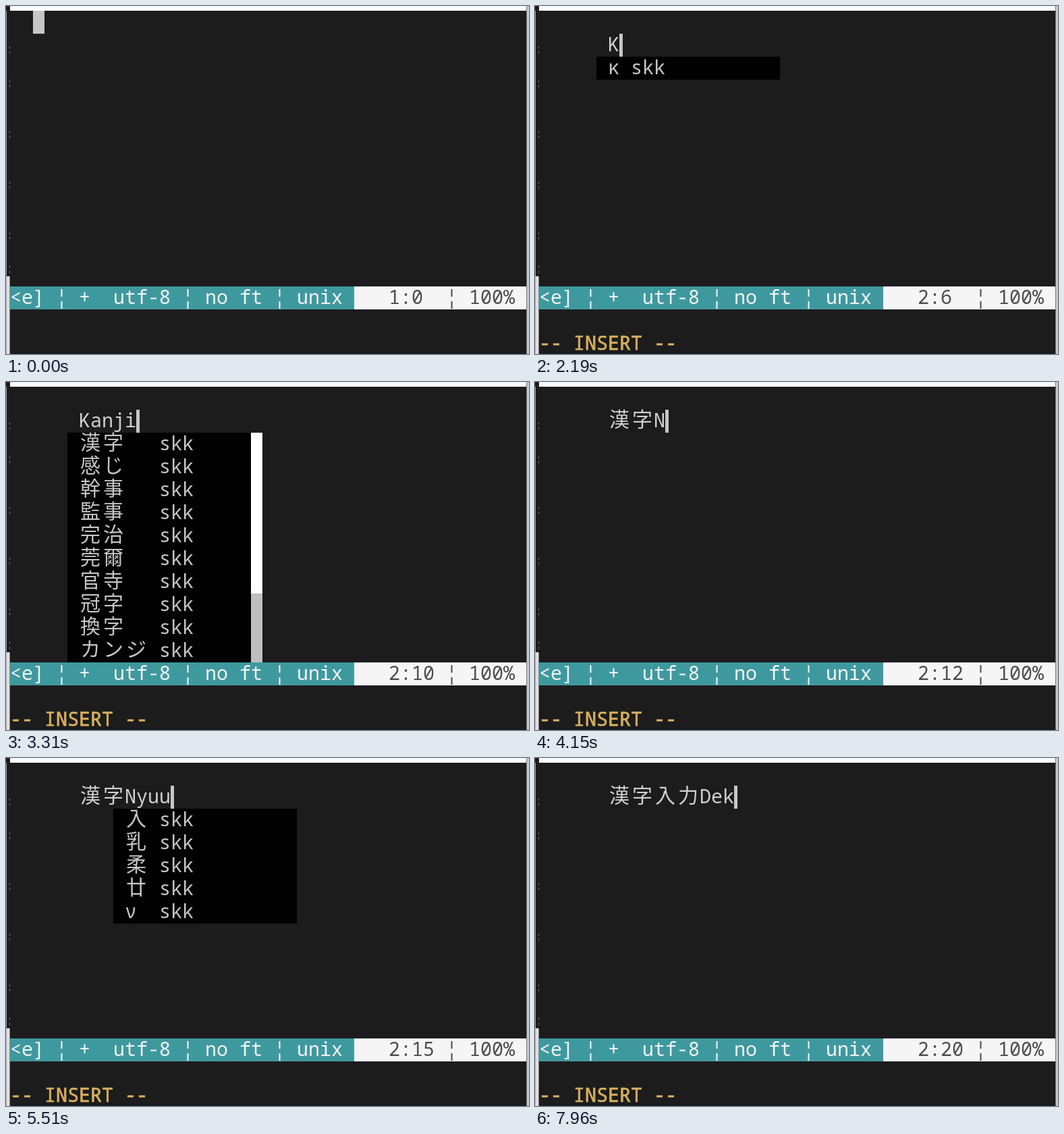
Recreate the animation shown at these times as an HTML page. Size 775 by 515 pixels, loop 8000 ms.

```html
<!DOCTYPE html>
<html lang="ja">
<head>
<meta charset="utf-8">
<title>Terminal input</title>
<style>
html, body { margin: 0; width: 100%; height: 100%; overflow: hidden; background: #1c1c1c; }
svg { display: block; position: absolute; left: 0; top: 0; }
text {
  font: 28.333px "Noto Sans Mono", "DejaVu Sans Mono", monospace;
  font-variant-ligatures: none;
  white-space: pre;
}
.wide { font: 30px "Noto Sans CJK JP", "Noto Sans CJK", sans-serif; text-anchor: middle; }
.mode { stroke: #d7af5f; stroke-width: .7px; }
</style>
</head>
<body>
<svg width="775" height="515" viewBox="0 0 775 515">
  <g id="back"></g>
  <g id="live"></g>
</svg>
<script>
const LOOP = 8000, CELL = 17, ROW = 34, LEFT = 6, TOP = 7;
const FG = '#d0d0d0', CURSOR = '#c6c6c6';
const TEXT_COL = 6;
const KANJI = ['漢字', '感じ', '幹事', '監事', '完治', '莞爾', '官寺', '冠字', '換字', 'カンジ'];
const NYUU = ['入', '乳', '柔', '廿', 'ν'];

// Each step lists only what differs from the resting state.
const steps = [
  [0, { block: true, pos: '1:0' }],
  [250, { hide: true, pos: '1:0' }],
  [400, { block: true, pos: '1:0' }],
  [800, { line: 0, col: 2, pos: '1:1', insert: true }],
  [950, { col: 2, pos: '2:1' }],
  [1230, {}],
  [1910, { text: 'K' }],
  [2190, { text: 'K', menu: ['κ'] }],
  [2330, { text: 'Ka' }],
  [2610, { text: 'Kan' }],
  [2880, { text: 'Kanji' }],
  [3310, { text: 'Kanji', menu: KANJI, bar: true }],
  [3600, { text: '漢字', menu: KANJI, bar: true, picked: true, pos: '2:10' }],
  [3730, { text: '漢字', menu: KANJI, bar: true, picked: true }],
  [4150, { text: '漢字N' }],
  [4440, { text: '漢字N', menu: ['ν'], from: 4 }],
  [4720, { text: '漢字Ny' }],
  [4970, { text: '漢字Nyu' }],
  [5220, { text: '漢字Nyuu' }],
  [5510, { text: '漢字Nyuu', menu: NYUU, from: 4 }],
  [5760, { text: '漢字Nyuur' }],
  [5910, { text: '漢字Nyuury' }],
  [6060, { text: '漢字Nyuuryo' }],
  [6210, { text: '漢字Nyuuryok' }],
  [6360, { text: '漢字Nyuuryoku' }],
  [6610, { text: '漢字Nyuuryoku', menu: ['入力'], from: 4 }],
  [7040, { text: '漢字入力', menu: ['入力'], from: 4, picked: true, pos: '2:20' }],
  [7170, { text: '漢字入力', menu: ['入力'], from: 4, picked: true }],
  [7570, { text: '漢字入力D' }],
  [7840, { text: '漢字入力De' }],
  [7960, { text: '漢字入力Dek' }]
];

const px = col => LEFT + col * CELL;
const py = row => TOP + row * ROW;
const isWide = ch => ch.codePointAt(0) > 0x2e80;
const cells = s => [...s].reduce((n, ch) => n + (isWide(ch) ? 2 : 1), 0);
const bytes = s => new TextEncoder().encode(s).length;
const rect = (x, y, w, h, fill) =>
  `<rect x="${x}" y="${y}" width="${w}" height="${h}" fill="${fill}"/>`;
const escape = s => s.replace(/&/g, '&amp;').replace(/</g, '&lt;');

function write(s, col, row, fill, cls = '') {
  const y = py(row) + 26;
  let out = '';
  for (const run of s.match(/[\u2e80-\uffff]|[^\u2e80-\uffff]+/g) || []) {
    const wide = isWide(run);
    out += `<text xml:space="preserve" class="${wide ? 'wide' : cls}" fill="${fill}" ` +
      `x="${px(col) + (wide ? CELL : 0)}" y="${wide ? y - 1 : y}">${escape(run)}</text>`;
    col += cells(run);
  }
  return out;
}

function drawMenu({ menu, from = 0, picked, bar }) {
  const col = TEXT_COL + from - 1;
  const widest = Math.max(...menu.map(cells));
  let out = rect(px(col), py(2), 16 * CELL, menu.length * ROW, '#000');
  menu.forEach((word, i) => {
    const on = picked && i === 0;
    const ink = on ? '#000' : CURSOR;
    if (on) out += rect(px(col), py(2), 16 * CELL, ROW, CURSOR);
    out += write(word, col + 1, i + 2, ink);
    out += write('skk', col + 2 + widest, i + 2, ink);
  });
  if (bar) {
    out += rect(px(col + 16), py(2), CELL, menu.length * ROW, '#bebebe');
    out += rect(px(col + 16), py(2), CELL, 7 * ROW, '#fff');
  }
  return out;
}

function drawStep(s) {
  const text = s.text || '';
  const idle = s.block || s.hide;
  const line = s.line ?? 1;
  const col = s.col ?? TEXT_COL + cells(text);
  let out = write(text, TEXT_COL, 1, FG);
  if (s.menu) out += drawMenu(s);
  if (s.block) out += rect(px(2), py(0), CELL, ROW, CURSOR);
  if (!idle) {
    out += rect(px(col), py(line), 5, ROW, CURSOR);
    out += write('-- INSERT --', 0, 14, '#d7af5f', 'mode');
  }
  return out + write(s.pos || '2:' + (5 + bytes(text)), 33, 12, '#4d4d4d');
}

function drawBack() {
  let out = rect(0, 0, 775, 515, '#1c1c1c');
  out += rect(6, 0, 766, 7, '#fcfcfc');
  out += rect(0, 7, 1, 508, '#a8a8a8');
  out += rect(1, 400, 4, 115, '#e0e0de') + rect(5, 400, 1, 115, '#8c8c8c');
  for (const y of [65, 115, 190, 265, 340, 390])
    out += rect(5, y - 5, 1, 3, '#777') + rect(5, y + 2, 1, 3, '#777');
  out += rect(771, 0, 1, 515, '#777') + rect(772, 0, 3, 515, '#c8c8c8');
  out += rect(LEFT, py(12), 30 * CELL, ROW, '#3e999f');
  out += rect(px(30), py(12), 15 * CELL, ROW, '#f5f5f5');
  out += write('<e] ¦ +  utf-8 ¦ no ft ¦ unix', 0, 12, '#f5f5f5');
  return out + write('¦ 100%', 38, 12, '#4d4d4d');
}

const live = document.getElementById('live');
document.getElementById('back').innerHTML = drawBack();
const start = performance.now();
let shown = -1;

function tick() {
  const t = (performance.now() - start) % LOOP;
  let i = steps.length - 1;
  while (steps[i][0] > t) i--;
  if (i !== shown) {
    live.innerHTML = drawStep(steps[i][1]);
    shown = i;
  }
  requestAnimationFrame(tick);
}
tick();
</script>
</body>
</html>
```
